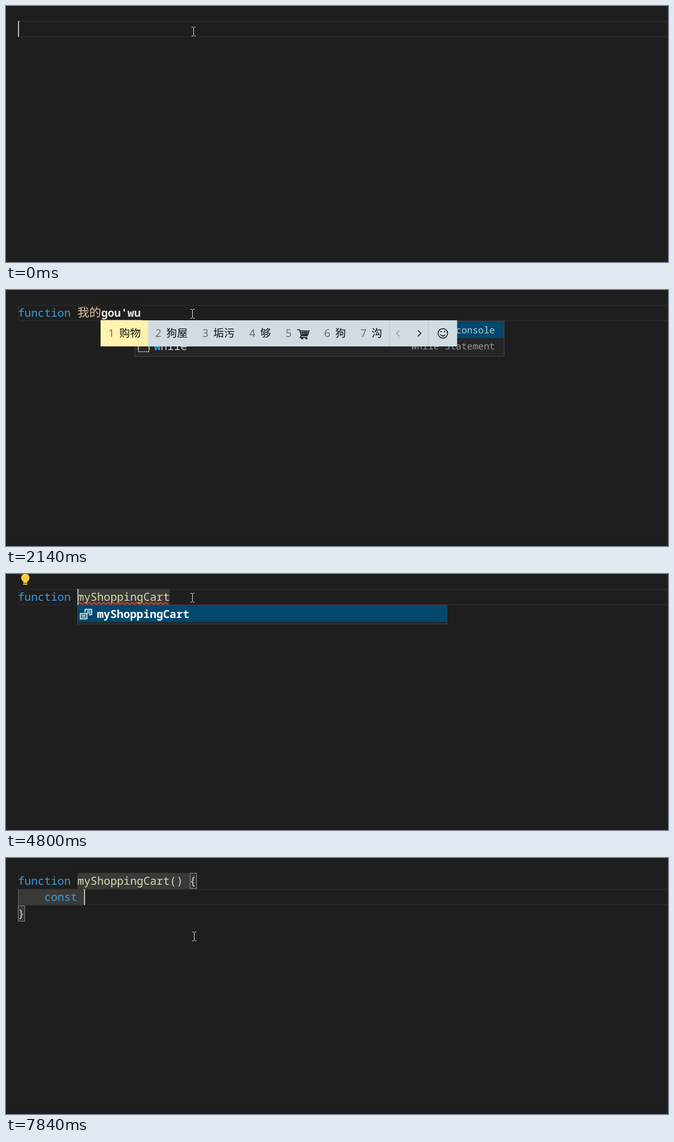
An HTML page with a canvas for the animation above (8 s loop, 1113 px wide and 431 px high).

```html
<!DOCTYPE html>
<html lang="en">
<head>
<meta charset="utf-8">
<title>Editor typing</title>
<style>
html, body { margin: 0; height: 100%; overflow: hidden; background: #1e1e1e; }
canvas { display: block; }
</style>
</head>
<body>
<canvas id="stage" width="1113" height="431"></canvas>
<script>
const ctx = document.getElementById('stage').getContext('2d');
const LOOP = 8000, CELL = 11.1, ROW = 27.3;
const KEY = '#3f9cd9', IDENT = '#7cc8f2', NAME = '#dcdcaa', HAN = '#d9c79c', WHITE = '#d4d4d4';
const MONO = '"Noto Sans Mono", "DejaVu Sans Mono", monospace';
const CJK = '"Noto Sans CJK SC", "Noto Sans CJK JP", "Noto Sans CJK", sans-serif';
const col = n => 20 + CELL * n;
const lineTop = n => 25 + ROW * n;

// Suggestions: [icon, label, detail]
const fItems = [
  ['keyword', 'function', 'function'], ['snippet', 'function', 'Function Statement'],
  ['keyword', 'for', 'for'], ['snippet', 'for', 'For Loop'],
  ['snippet', 'foreach', 'For-Each Loop'], ['snippet', 'forin', 'For-In Loop'],
  ['variable', 'Function'], ['variable', 'FocusEvent'], ['variable', 'File'],
  ['variable', 'FormData'], ['variable', 'FontFace'],
  ['variable', 'SVGComponentTransferFunctionElement']
];
const wItems = [['snippet', 'warn', 'Log warning to the console'], ['snippet', 'while', 'While Statement']];
const cartItems = [['text', 'myShoppingCart']];

const fn = ['function ', KEY];
const han = text => [[fn, [text, HAN]]];
const call = tail => [[fn, ['myShoppingCart', NAME], [tail, WHITE]]];
const block = body => [...call('() {'), [['    ' + body, KEY]], [['}', WHITE]]];
const ime = (x, typed, words) => ({ x, typed, words: words.split(' ') });
const mark = (from, to, line = 0) => [from, to, line];
const nameMark = mark(col(9), col(23));
const bodyMarks = end => [mark(col(9), col(27)), mark(20, col(end), 1)];

// Each step changes part of the picture from its time on.
const steps = [
  [0, { mouse: [315, 43], code: [], caret: [20, 0], current: 0, marks: [], boxes: [] }],
  [150, { mouse: [313, 40] }],
  [420, { code: [[['f', IDENT]]], caret: [col(1), 0], popup: { x: 31, items: fItems, query: 'f' } }],
  [550, { code: [[['fu', IDENT]]], caret: [col(2), 0], popup: { x: 42, items: fItems, query: 'fu' } }],
  [680, { code: [[['fun', IDENT]]], caret: [col(3), 0], popup: { x: 53, items: fItems, query: 'fun' } }],
  [950, { code: [[['function', KEY]]], caret: [col(8), 0], popup: null }],
  [1080, { code: [[fn]], caret: [col(9), 0] }],
  [1360, { caret: null, ime: ime(120, 'w', '我 为 无 万 玩 晚 五'), popup: { x: 131, items: wItems, query: 'w' } }],
  [1620, { ime: ime(120, "wo'd", '我的 我等 我 握 窝 卧 沃') }],
  [1750, { ime: ime(120, "wo'de", '我的 我得 我 握 窝 卧 沃') }],
  [1880, { code: han('我的'), caret: [160, 0], ime: null, popup: null }],
  [2010, { caret: null, ime: ime(159, "gou'w", '购物 够玩 狗窝 够 购 狗 沟'), popup: { x: 216, items: wItems, query: 'w' } }],
  [2140, { ime: ime(159, "gou'wu", '购物 狗屋 垢污 够 🛒 狗 沟') }],
  [2270, { ime: ime(159, "gou'wu'che", '购物车 购物 狗屋 够 🛒 狗 沟') }],
  [2400, { code: han('我的购物车'), caret: [220, 0], ime: null, popup: null }],
  [2530, { popup: { x: 220, items: wItems, query: 'w' } }],
  [2660, { popup: null }],
  [2790, { squiggle: [120, 220] }],
  [3060, { selection: true, current: -1, caret: [120, 0] }],
  [3330, { bulb: true, caret: null }],
  [3600, { caret: [120, 0] }],
  [3870, { code: call(''), selection: false, current: 0, squiggle: null, popup: { x: 120, items: cartItems, query: '' } }],
  [4270, { marks: [nameMark], caret: null }],
  [4400, { squiggle: [120, 275] }],
  [4800, { caret: [120, 0] }],
  [4930, { popup: null }],
  [5060, { bulb: false, caret: [col(23), 0], marks: [], squiggle: null }],
  [5320, { marks: [nameMark], squiggle: [120, 275] }],
  [5600, { code: call('()'), caret: [col(25), 0], boxes: [[col(23), 0], [col(24), 0]] }],
  [5860, { code: call('() '), caret: [col(26), 0], boxes: [] }],
  [5990, { code: call('() {'), caret: [col(27), 0] }],
  [6120, { code: call('() {}'), caret: [col(27), 0], squiggle: null, marks: [mark(col(9), col(28))], boxes: [[col(26), 0], [col(27), 0]] }],
  [6390, { code: block(''), caret: [col(4), 1], current: 1, marks: bodyMarks(4), boxes: [[col(26), 0], [20, 2]] }],
  [6920, { mouse: [315, 92], caret: null }],
  [7050, { mouse: [316, 132], caret: [col(4), 1] }],
  [7710, { code: block('const'), caret: [col(9), 1], marks: bodyMarks(9) }],
  [7840, { code: block('const '), caret: [col(10), 1], marks: bodyMarks(10) }]
];

function rect(x, y, w, h, color) {
  ctx.fillStyle = color;
  ctx.fillRect(x, y, w, h);
}

function frame(x, y, w, h, color, width = 1) {
  ctx.strokeStyle = color;
  ctx.lineWidth = width;
  ctx.strokeRect(x, y, w, h);
}

function path(d, color, width = 1, dx = 0, dy = 0) {
  ctx.save();
  ctx.translate(dx, dy);
  ctx.strokeStyle = color;
  ctx.lineWidth = width;
  ctx.stroke(new Path2D(d));
  ctx.restore();
}

function print(text, x, y, color, font) {
  ctx.font = font;
  ctx.fillStyle = color;
  ctx.fillText(text, x, y);
  return x + ctx.measureText(text).width;
}

function write(text, x, y, color, weight = 400) {
  const font = /[\u4e00-\u9fff]/.test(text) ? `300 20px ${CJK}` : `${weight} 18.5px ${MONO}`;
  return print(text, x, y, color, font);
}

const icons = {
  keyword(x, y, color) {
    ctx.save();
    ctx.translate(x - 1, y - 11);
    ctx.scale(1.375, 1.375);
    for (const [left, top, w] of [[10, 3, 5], [12, 7, 2], [1, 7, 9], [1, 13, 11], [1, 10, 6], [10, 10, 5]])
      rect(left, top, w, 1.1, color);
    frame(1.5, 2.5, 6, 2, color);
    ctx.restore();
  },
  snippet(x, y, color) {
    path('M2.5 7V-9.5H20.5V7M2 9H5M6 9H8M9 9H11M12 9H14M15 9H17M18 9H21', color, 1.6, x, y);
  },
  variable(x, y) {
    path('M5 -6H2V6H5M17 -6H20V6H17M6.5 -.5L11.5 -4L15.5 -2.5V1L10.5 4.5L6.5 2.5ZM6.5 -.5L10.5 1L15.5 -2.5M10.5 1V4.5', '#75beff', 1.4, x, y);
  },
  text(x, y, color) {
    path('M9 -3V-8H20V1H15M12 -5H18M12 -2H18M1 -1H12V8H1ZM3 2H10M3 5H10', color, 1.5, x, y);
  }
};

// Indexes of the letters that match the query, or null.
function match(label, query) {
  const low = label.toLowerCase(), start = low.indexOf(query);
  if (start >= 0) return [...query].map((_, i) => start + i);
  let at = -1;
  const hits = [...query].map(c => at = at === null ? null : (low.indexOf(c, at + 1) + 1 || null) && low.indexOf(c, at + 1));
  return hits.includes(null) ? null : hits;
}

function drawPopup({ x, items, query }) {
  const rows = items.filter(item => match(item[1], query));
  const height = rows.length * ROW + 5;
  rect(x, 52, 622, height, '#252526');
  rect(x + 1, 53, 620, 28, '#00486e');
  frame(x + .5, 52.5, 621, height - .5, '#454545');
  rows.forEach(([icon, label, detail], i) => {
    const mid = 67.5 + ROW * i, base = mid + 6.5, chosen = i === 0;
    const hits = match(label, query);
    icons[icon](x + 4, mid, chosen ? '#fff' : '#ccc');
    let pen = x + 33;
    [...label].forEach((c, k) => {
      const hit = hits.includes(k);
      pen = write(c, pen, base, hit ? '#18a3ff' : chosen ? '#fff' : WHITE, hit || chosen ? 600 : 400);
    });
    if (detail && (chosen || icon === 'snippet')) {
      ctx.textAlign = 'right';
      print(detail, x + 606, base - 1, chosen ? '#b9cbd6' : '#969696', `15.65px ${MONO}`);
      ctx.textAlign = 'left';
    }
  });
}

function drawCart(x) {
  path('M1 -5H5L8 5H18L21 -3H6M7 0H19M8 3H18M10 -3L11 5M14 -3V5M17 -3L16 5M8 5L6 8H18', '#111', 1.5, x, 72);
  rect(x + 8, 80, 3, 3, '#111');
  rect(x + 15, 80, 3, 3, '#111');
}

function drawIme({ x, typed, words }, start) {
  rect(start, 26, typed.length * CELL, 26, '#1e1e1e');
  const end = write(typed, start, 45, '#e4e4e4', 600);
  for (let dot = start; dot < end; dot += 3) rect(dot, 50, 1.5, 1.5, '#ccc');

  // Candidate places depend on the width of each word.
  let pen = x + 13;
  const cells = words.map((word, i) => {
    const left = pen + 18.5, right = left + (word === '🛒' ? 22 : word.length * 18);
    pen = right + 24.5;
    return { word, digit: left - 18.5, left, right };
  });
  const last = cells[cells.length - 1].right;
  rect(x, 51, last + 126 - x, 44, '#d0dce1');
  rect(x, 51, cells[0].right + 12 - x, 44, '#fff3ae');
  cells.forEach(({ word, digit, left }, i) => {
    print(i + 1, digit, 79, '#666', '18px "Open Sans", sans-serif');
    if (word === '🛒') drawCart(left);
    else print(word, left, 79, '#111', `18px ${CJK}`);
  });
  rect(last + 12, 51, 1, 44, '#b8c5ca');
  rect(last + 77, 51, 1, 44, '#b8c5ca');
  path('M3 -5L-2 0L3 5', '#8c979b', 1.2, last + 26, 73);
  path('M-3 -5L2 0L-3 5', '#111', 1.5, last + 63, 73);
  path('M8 0A8 8 0 1 1 -8 0A8 8 0 1 1 8 0M-4 2Q0 7 4 2', '#111', 1.4, last + 102, 73);
  rect(last + 98, 69, 2, 2, '#111');
  rect(last + 104, 69, 2, 2, '#111');
}

function drawSquiggle([from, to]) {
  let d = `M${from} 51`;
  for (let x = from + 4, up = true; x <= to; x += 4, up = !up) d += `L${x} ${up ? 48 : 51}`;
  path(d, '#e8484c', 1.4);
}

function drawBulb() {
  ctx.fillStyle = '#ffcc3d';
  ctx.beginPath();
  ctx.arc(32.5, 6.5, 7, 0, 7);
  ctx.fill();
  rect(29, 11, 7, 4, '#ffcc3d');
  rect(29, 16, 7, 2, '#ffcc3d');
}

function draw(s) {
  rect(0, 0, 1113, 431, '#1e1e1e');
  rect(0, 427, 1113, 4, '#1f1c1e');
  if (s.current >= 0) frame(21, Math.round(lineTop(s.current)) + 1, 1100, 25.5, '#282828', 2);
  if (s.selection) rect(120, 25, 100, 27, '#174d75');
  for (const [from, to, line] of s.marks) rect(from, lineTop(line), to - from, 27.3, '#3a3a39');
  if (s.code.length > 1) rect(20, 52, 1, 28, '#606060');
  for (const [x, line] of s.boxes) {
    const y = Math.round(lineTop(line)) + .5;
    rect(x, y, 11, 26, '#323a32');
    frame(Math.round(x) + .5, y, 11, 26, '#808080');
  }
  let end = 20;
  s.code.forEach((runs, line) => {
    end = 20;
    for (const [text, color] of runs) end = write(text, end, 45 + ROW * line, color);
  });
  if (s.squiggle) drawSquiggle(s.squiggle);
  if (s.bulb) drawBulb();
  if (s.popup) drawPopup(s.popup);
  if (s.ime) drawIme(s.ime, end);
  if (s.caret) rect(Math.round(s.caret[0]), Math.round(lineTop(s.caret[1])), 2, 27, '#b4b4b2');
  path('M-3.5 -7.5H-1M1 -7.5H3.5M-3.5 7.5H-1M1 7.5H3.5M0 -7V7', '#dedede', 1, s.mouse[0] + .5, s.mouse[1]);
}

function tick(now) {
  const state = {};
  for (const [at, change] of steps) if (now % LOOP >= at) Object.assign(state, change);
  draw(state);
  requestAnimationFrame(tick);
}

ctx.textRendering = 'geometricPrecision';
requestAnimationFrame(tick);
</script>
</body>
</html>
```
